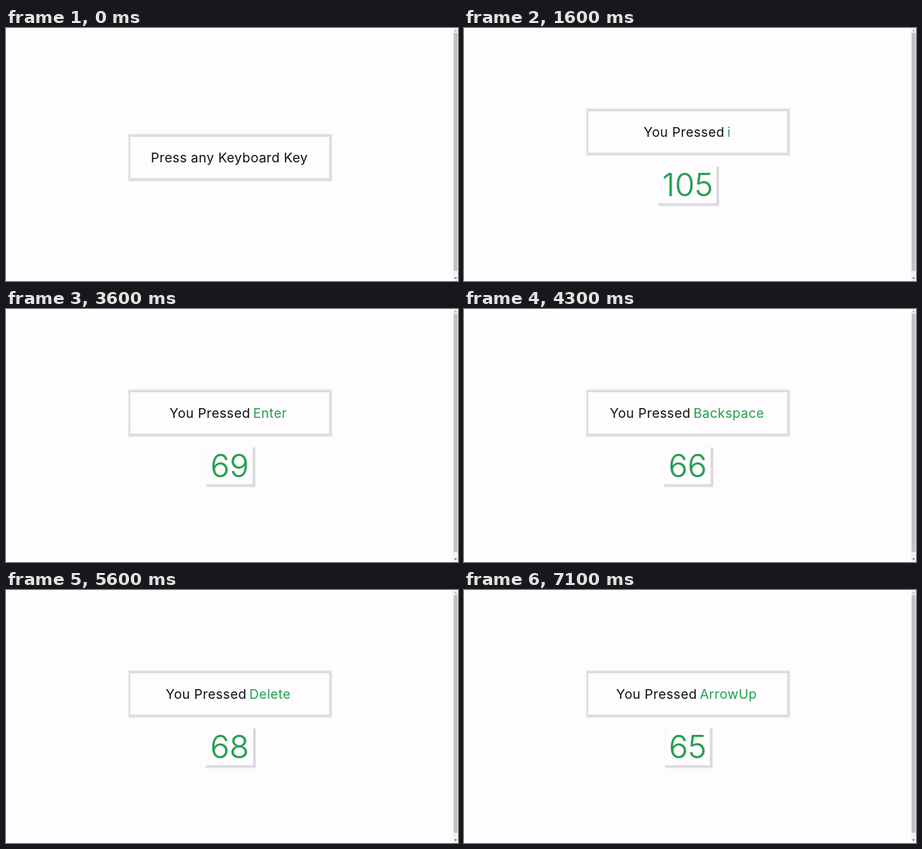
An HTML page with a canvas that plays this animation: 600x337 px, repeating every 7.3 s.

```html
<!DOCTYPE html>
<html lang="en">
<head>
<meta charset="utf-8">
<title>Key code viewer</title>
<style>
  html, body { margin: 0; width: 100%; height: 100%; overflow: hidden; background: #fefcff; }
  canvas { display: block; }
</style>
</head>
<body>
<canvas id="stage" width="600" height="337"></canvas>
<script>
const ctx = document.getElementById('stage').getContext('2d');
const LOOP = 7300;
const CENTER = 297;
const PAPER = '#fefcff';
const INK = '#101010';
const GREEN = '#20a04c';
const LABEL_FONT = '17.5px Inter, "Open Sans", sans-serif';
const CODE_FONT = '300 42.5px Inter, "Open Sans", sans-serif';

// left: start of the label, width: size of the code card
const presses = [
  { at: 1500, key: 'i', code: '105', left: 238.5, width: 77 },
  { at: 2300, key: 'e', code: '101', left: 235.5, width: 68 },
  { at: 3600, key: 'Enter', code: '69', left: 217, width: 62 },
  { at: 4100, key: 'Backspace', code: '66', left: 193.5, width: 62 },
  { at: 5000, key: 'Delete', code: '68', left: 212, width: 63 },
  { at: 5800, key: 'ArrowUp', code: '65', left: 202, width: 60 }
];

function rect(color, x, y, w, h) {
  ctx.fillStyle = color;
  ctx.fillRect(x, y, w, h);
}

function label(text, x, y, color) {
  ctx.font = LABEL_FONT;
  ctx.letterSpacing = '0.36px';
  ctx.textAlign = 'left';
  ctx.fillStyle = color;
  ctx.fillText(text, x, y);
}

function triangle(color, y, tip) {
  ctx.fillStyle = color;
  ctx.beginPath();
  ctx.moveTo(595, y);
  ctx.lineTo(598.6, y);
  ctx.lineTo(596.8, y + tip);
  ctx.fill();
}

function scrollbar() {
  rect('#f1f1f1', 593.5, 0, 6.5, 337);
  rect('#c1c1c1', 594.3, 6.5, 5, 317);
  triangle('#a3a3a3', 4.3, -2);
  triangle('#505050', 332.3, 2);
}

function frameBox(top) {
  rect('#f0eff1', 161.5, top - 3.5, 272, 64);
  rect('#dcdbdd', 163, top - 2, 269, 61.5);
  rect(PAPER, 165, top + 1, 264, 55);
}

function codeCard(code, width) {
  const x = CENTER - width / 2 - 0.5;
  rect('#f9f8fa', x - 0.7, 183.3, width + 1, 50);
  rect('#eae9eb', x, 184, width + 4, 53.5);
  rect('#d9d8da', x + 1, 185, width + 2, 51.3);
  rect(PAPER, x, 184, width, 49.5);

  ctx.save();
  ctx.font = CODE_FONT;
  ctx.letterSpacing = '0px';
  ctx.textAlign = 'center';
  ctx.shadowColor = 'rgba(70, 130, 90, 0.4)';
  ctx.shadowBlur = 1;
  ctx.shadowOffsetX = ctx.shadowOffsetY = 0.7;
  ctx.fillStyle = GREEN;
  ctx.fillText(code, CENTER - 0.2, 223.6);
  ctx.restore();
}

function draw(time) {
  const press = presses.findLast(p => time >= p.at);
  rect(PAPER, 0, 0, 600, 337);
  scrollbar();
  if (press) {
    frameBox(110);
    label('You Pressed', press.left, 145.3, INK);
    label(press.key, press.left + 110.9, 145.3, GREEN);
    codeCard(press.code, press.width);
  } else {
    frameBox(144);
    label('Press any Keyboard Key', 192.3, 179.3, INK);
  }
}

function tick() {
  draw(performance.now() % LOOP);
  requestAnimationFrame(tick);
}
tick();
</script>
</body>
</html>
```
